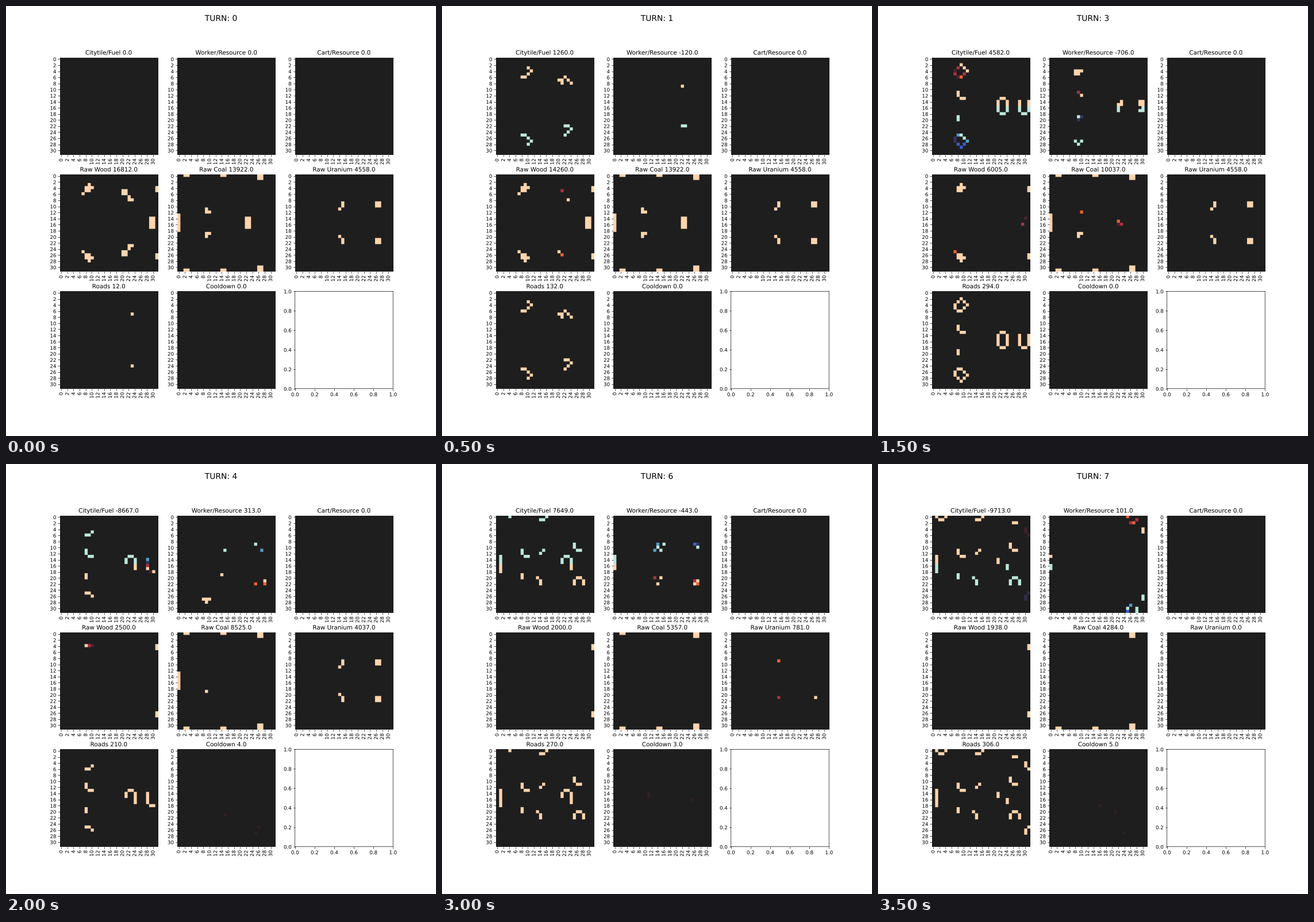
These frames come from a looping animation (748 px wide and 748 px high, 4 s). A matplotlib script:

```python
import numpy as np
import matplotlib.pyplot as plt
from matplotlib.animation import FuncAnimation
from matplotlib.colors import LinearSegmentedColormap
from matplotlib.patheffects import Normal

STAGE, INCHES, N, TURNS = 748, 12, 32, 8
FOREVER = TURNS
SMOOTH = 8  # samples per cell, so that cell edges keep their sub-pixel place

# Path text and unsnapped lines also sit at sub-pixel positions.
plt.rcParams.update({"font.family": "DejaVu Sans", "path.snap": False,
                     "path.effects": [Normal()]})

ICEFIRE = LinearSegmentedColormap.from_list("icefire", [
    "#bde7db", "#86c6d6", "#55a3cd", "#3c7fd5", "#4257c5", "#45418a",
    "#2f2d44", "#1e1e1e", "#38202a", "#6b2a3f", "#a62e46", "#d0403c",
    "#ea663a", "#fba25e", "#ffd4ac"], N=256)


def box(c, r, w=1, h=1):
    return {(c + i, r + j) for i in range(w) for j in range(h)}


def flip(cells):
    return {(c, N - 1 - r) for c, r in cells}


# Deposits in the upper half; the map is mirrored about its middle row.
GROVE = box(9, 3) | box(8, 4, 3) | box(8, 5, 2)
TAIL = box(7, 6)
THICKET = box(20, 5, 2, 2)
STEP = box(22, 7) | box(22, 8, 2)
EDGE_WOOD = box(31, 4, 1, 2)
EAST_WOOD = box(29, 14, 2, 2)
LEFT_COAL = box(2, 0, 2)
MID_COAL = box(14, 0, 2)
RIGHT_COAL = box(26, 0, 2, 2)
WEST_COAL = box(0, 13, 1, 3)
EAST_COAL = box(22, 14, 2, 2)
SEAM = box(9, 11) | box(9, 12, 2)
HOOK = box(15, 9, 1, 2) | box(14, 11)
BLOCK = box(26, 9, 2, 2)

# Deposit, last full turn in the upper half and in the lower half
WOOD = [(GROVE, 3, 3), (TAIL, 2, 2), (THICKET, 0, 0), (STEP, 0, 0),
        (EAST_WOOD, 2, 2), (EDGE_WOOD, FOREVER, FOREVER)]
COAL = [(LEFT_COAL, 6, FOREVER), (MID_COAL, 4, FOREVER),
        (RIGHT_COAL, FOREVER, FOREVER), (WEST_COAL, 4, 4),
        (EAST_COAL, 2, 2), (SEAM, 2, 3)]
URANIUM = [(HOOK, 5, 5), (BLOCK, 5, 5)]

FULL, MIXED, FAINT, TRACE = (1,), (.2, .45, .7, 1, 1), (.16,), (.012,)

# Deposit, first turn, last turn, occupied sides above and below, strengths
CITIES = [
    (box(22, 7), 0, 0, "E", "E", TRACE),
    (GROVE, 1, 1, "SE", "SE", FULL),
    (GROVE, 2, 3, "NSWE", "NSWE", MIXED),
    (GROVE, 4, 4, "S", "S", FULL),
    (TAIL, 2, 2, "W", "S", MIXED),
    (THICKET, 1, 2, "S", "", FULL),
    (STEP, 1, 2, "NWE", "NES", FULL),
    (EAST_WOOD, 2, 2, "NWE", "NWE", FULL),
    (EAST_WOOD, 3, 3, "WE", "NWE", FULL),
    (EAST_WOOD, 4, 4, "W", "NW", MIXED),
    (EAST_COAL, 3, 3, "NWE", "NWE", FULL),
    (EAST_COAL, 4, 6, "NWE", "E", FULL),
    (EAST_COAL, 7, 7, "W", "E", FULL),
    (SEAM, 3, 7, "WS", "W", FULL),
    (WEST_COAL, 5, 7, "E", "E", FULL),
    (HOOK, 5, 7, "S", "W", FULL),
    (BLOCK, 5, 7, "WS", "SWE", FULL),
    (MID_COAL, 6, 7, "ES", "", FULL),
    (LEFT_COAL, 6, 6, "E", "", FULL),
    (LEFT_COAL, 7, 7, "WES", "", FULL),
    (RIGHT_COAL, 7, 7, "S", "", FULL),
    (EDGE_WOOD, 7, 7, "SW", "SW", FAINT),
]
WORKERS = [
    (STEP, 1, 1, "S", "S", MIXED),
    (TAIL, 2, 2, "S", "O", MIXED),
    (EAST_COAL, 2, 2, "N", "N", FAINT),
    (EAST_WOOD, 2, 3, "O", "O", FULL),
    (EAST_COAL, 3, 3, "O", "O", FULL),
    (SEAM, 3, 3, "O", "O", MIXED),
    (GROVE, 3, 3, "O", "O", FULL),
    (GROVE, 4, 4, "", "O", FULL),
    (HOOK, 4, 4, "S", "S", MIXED),
    (BLOCK, 4, 4, "SWE", "SWE", MIXED),
    (HOOK, 5, 6, "WE", "WE", MIXED),
    (BLOCK, 5, 6, "O", "O", MIXED),
    (WEST_COAL, 5, 7, "O", "O", FULL),
    (RIGHT_COAL, 7, 7, "WES", "WES", MIXED),
    (EDGE_WOOD, 7, 7, "W", "W", FULL),
]
STEPS = {"N": (0, -1), "S": (0, 1), "W": (-1, 0), "E": (1, 0)}


def beside(site, sides):
    """Cells touching a site on the given sides; O is the site itself."""
    found = set(site) if "O" in sides else set()
    for s in sides.replace("O", ""):
        dx, dy = STEPS[s]
        found |= {(c + dx, r + dy) for c, r in site} - site
    return {(c, r) for c, r in found if 0 <= c < N and 0 <= r < N}


def settle(plan, turn, density=1):
    """The two teams hold opposite signs, which swap every turn."""
    rng = np.random.default_rng(turn)
    grid = np.zeros((N, N))
    for site, first, last, top, bottom, strengths in plan:
        if first <= turn <= last:
            cells = beside(site, top) | flip(beside(site, bottom))
            for c, r in sorted(cells):
                if rng.random() < density:
                    team = 1 if r < N // 2 else -1
                    grid[r, c] = team * (-1) ** (turn + 1) * rng.choice(strengths)
    return grid


def deposits(kinds, turn):
    """Full until its last turn, then scattered leftovers, then nothing."""
    rng = np.random.default_rng(turn + 40)
    grid = np.zeros((N, N))
    for site, *lives in kinds:
        for cells, life in zip((site, flip(site)), lives):
            for c, r in sorted(cells):
                if turn <= life:
                    grid[r, c] = 1
                elif turn == life + 1 and rng.random() < .35:
                    grid[r, c] = rng.choice(MIXED)
    return grid


def resting(turn):
    grid = np.zeros((N, N))
    if COOLDOWN[turn]:
        rng = np.random.default_rng(turn)
        grid[rng.integers(2, 29, 3), rng.integers(3, 27, 3)] = .1
    return grid


COOLDOWN = [0, 0, 5, 0, 4, 0, 3, 5]

# Title, rule for the cells, total per turn
PANELS = [
    ("Citytile/Fuel", lambda t: settle(CITIES, t),
     [0, 1260, -3024, 4582, -8667, 5840, 7649, -9713]),
    ("Worker/Resource", lambda t: settle(WORKERS, t, .65),
     [0, -120, 286, -706, 313, 218, -443, 101]),
    ("Cart/Resource", lambda t: np.zeros((N, N)), [0] * TURNS),
    ("Raw Wood", lambda t: deposits(WOOD, t),
     [16812, 14260, 10612, 6005, 2500, 2000, 2000, 1938]),
    ("Raw Coal", lambda t: deposits(COAL, t),
     [13922, 13922, 13627, 10037, 8525, 6940, 5357, 4284]),
    ("Raw Uranium", lambda t: deposits(URANIUM, t),
     [4558] * 4 + [4037, 2410, 781, 0]),
    ("Roads", lambda t: settle(CITIES, t) != 0,
     [12, 132, 264, 294, 210, 228, 270, 306]),
    ("Cooldown", resting, COOLDOWN),
]

fig, axes = plt.subplots(3, 3, figsize=(INCHES, INCHES), dpi=STAGE / INCHES,
                         facecolor="white")
heading = fig.suptitle("TURN: 0", fontsize=16)


def heatmap(ax):
    image = ax.imshow(np.zeros((N, N)), cmap=ICEFIRE, vmin=-1, vmax=1,
                      extent=(0, N, N, 0), aspect="auto",
                      interpolation="hanning", interpolation_stage="rgba")
    labels = np.arange(0, N, 2)
    ax.set_xticks(labels + .5, labels, rotation="vertical")
    ax.set_yticks(labels + .5, labels)
    ax.spines[:].set_visible(False)
    return image


images = [heatmap(ax) for ax in axes.flat[:len(PANELS)]]


def draw(turn):
    heading.set_text(f"TURN: {turn}")
    for ax, image, (name, rule, totals) in zip(axes.flat, images, PANELS):
        image.set_data(np.kron(rule(turn), np.ones((SMOOTH, SMOOTH))))
        ax.set_title(f"{name} {totals[turn]:.1f}")
    return images


anim = FuncAnimation(fig, draw, frames=TURNS, init_func=lambda: draw(0),
                     interval=500, repeat=True, repeat_delay=0)
plt.show()
```
